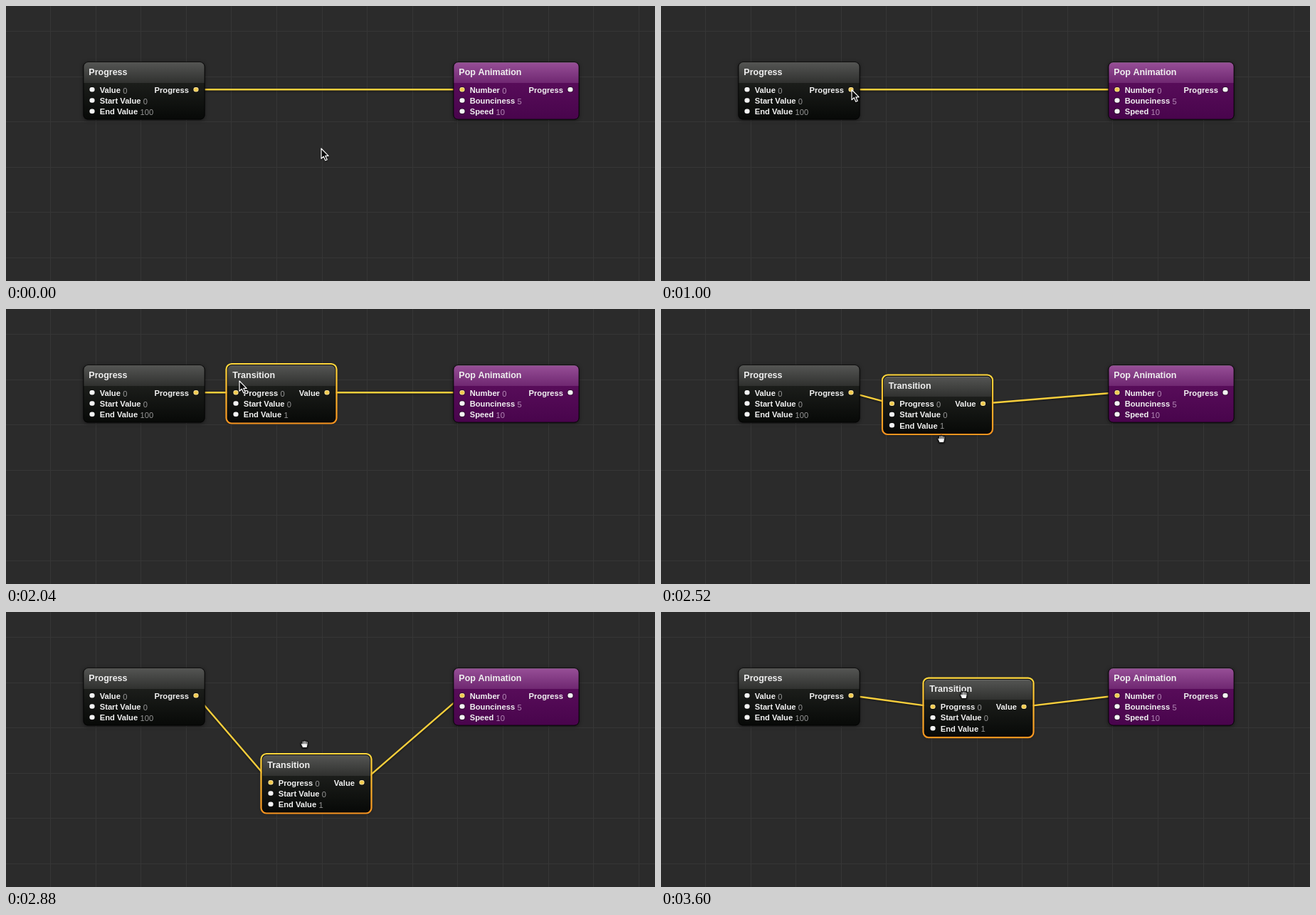
An HTML page with a canvas that plays this animation: 912 by 386 pixels, repeating every 3640 ms.

```html
<!DOCTYPE html>
<html lang="en">
<head>
<meta charset="utf-8">
<title>Inserting a patch</title>
<style>
html, body { margin: 0; width: 100%; height: 100%; overflow: hidden; background: #2b2b2b; }
canvas { display: block; }
</style>
</head>
<body>
<canvas id="stage" width="912" height="386"></canvas>
<script>
const ctx = document.getElementById('stage').getContext('2d');
const LOOP = 3640, STEP = 40;
const INSERT = 1520, GRAB = 2360, LAG = 80;
const GRIP = { x: 55.5, y: 21.5 };
const FONT = '"Liberation Sans", Arial, sans-serif';

// Pointer paths: [time, x, y]
const arrowPath = [
  [0, 443, 200], [240, 443, 200], [860, 270, 120], [960, 268, 117.5],
  [1640, 268, 117.5], [2040, 328, 101], [2280, 362, 95], [2360, 363.5, 94.5]
];
const handPath = [
  [2360, 366.5, 100.5], [2440, 368, 116], [2520, 394, 182], [2600, 408, 246],
  [2680, 412, 254], [2800, 415.5, 222.5], [2880, 419.5, 185], [3080, 423, 146.5],
  [3160, 425, 131], [3320, 425.5, 117], [3600, 425.5, 116]
];

const dark = { head: ['#5b5c5a', '#333432'], body: ['#1d1f1c', '#070907'], shine: '#858684' };
const purple = { head: ['#a355a3', '#782a7a'], body: ['#5e0c60', '#4e0452'], shine: '#c48ac4' };

const progress = {
  title: 'Progress', x: 109, y: 79, w: 170, skin: dark, output: 'Progress', outWired: true,
  inputs: [['Value', 0], ['Start Value', 0], ['End Value', 100]]
};
const pop = {
  title: 'Pop Animation', x: 629, y: 79, w: 176, skin: purple, output: 'Progress', inWired: true,
  inputs: [['Number', 0], ['Bounciness', 5], ['Speed', 10]]
};
const transition = {
  title: 'Transition', w: 152, skin: dark, output: 'Value', selected: true, inWired: true, outWired: true,
  inputs: [['Progress', 0], ['Start Value', 0], ['End Value', 1]]
};

// Monotone cubic interpolation along a path
function follow(path, t) {
  const last = path.length - 1;
  if (t <= path[0][0]) return { x: path[0][1], y: path[0][2] };
  if (t >= path[last][0]) return { x: path[last][1], y: path[last][2] };
  const i = path.findIndex(key => key[0] > t) - 1;
  const span = path[i + 1][0] - path[i][0], u = (t - path[i][0]) / span;
  const axis = d => {
    const slope = k => (path[k + 1][d] - path[k][d]) / (path[k + 1][0] - path[k][0]);
    const tangent = k => {
      if (k === 0 || k === last) return 0;
      const a = slope(k - 1), b = slope(k);
      return a * b > 0 ? 2 * a * b / (a + b) : 0;
    };
    const p = path[i][d], q = path[i + 1][d], ease = u * u * (3 - 2 * u);
    return p + (q - p) * ease
      + span * u * (1 - u) * (tangent(i) * (1 - u) - tangent(i + 1) * u);
  };
  return { x: axis(1), y: axis(2) };
}

function vertical(y0, y1, [from, to]) {
  const g = ctx.createLinearGradient(0, y0, 0, y1);
  g.addColorStop(0, from);
  g.addColorStop(1, to);
  return g;
}

function box(x, y, w, h, r) {
  ctx.beginPath();
  ctx.roundRect(x, y, w, h, r);
}

function text(str, x, y, font, color, align = 'left') {
  ctx.font = `${font} ${FONT}`;
  ctx.fillStyle = color;
  ctx.textAlign = align;
  ctx.fillText(str, x, y);
}

function drawGrid() {
  ctx.fillStyle = '#2b2b2b';
  ctx.fillRect(0, 0, 912, 386);
  ctx.fillStyle = '#363636';
  for (let x = 62; x < 912; x += 63.6) ctx.fillRect(Math.round(x), 0, 1, 386);
  for (let y = 35; y < 386; y += 63.6) ctx.fillRect(0, Math.round(y), 912, 1);
}

function drawWire(from, to) {
  ctx.save();
  ctx.shadowColor = 'rgba(0,0,0,.6)';
  ctx.shadowBlur = 3;
  ctx.shadowOffsetY = 1;
  ctx.strokeStyle = '#f8cf3c';
  ctx.lineWidth = 2.4;
  ctx.beginPath();
  ctx.moveTo(from.x + from.w - 12, from.y + 38.3);
  ctx.lineTo(to.x + 12, to.y + 38.3);
  ctx.stroke();
  ctx.restore();
}

function drawPort(x, y, wired) {
  box(x - 4.5, y - 4, 9, 8, 4);
  ctx.fillStyle = 'rgba(0,0,0,.55)';
  ctx.fill();
  box(x - 3.6, y - 3.2, 7.2, 6.4, 3);
  ctx.fillStyle = wired ? '#f4dfa0' : '#f4f4f4';
  ctx.fill();
  if (!wired) return;
  box(x - 2.7, y - 2.3, 5.4, 4.6, 2.2);
  ctx.fillStyle = '#f3cb4c';
  ctx.fill();
}

function drawPatch({ title, x, y, w, skin, inputs, output, inWired, outWired, selected }) {
  const h = 80, head = 29;
  ctx.save();
  ctx.shadowColor = 'rgba(0,0,0,.7)';
  ctx.shadowBlur = 5;
  ctx.shadowOffsetY = 1;
  box(x - .5, y - .5, w + 1, h + 1, 6.5);
  ctx.fillStyle = 'rgba(8,8,8,.75)';
  ctx.fill();
  ctx.restore();

  ctx.save();
  box(x, y, w, h, 6);
  ctx.clip();
  ctx.globalAlpha = .92;
  ctx.fillStyle = vertical(y, y + head, skin.head);
  ctx.fillRect(x, y, w, head);
  ctx.fillStyle = vertical(y + head, y + h, skin.body);
  ctx.fillRect(x, y + head, w, h - head);
  ctx.fillStyle = skin.shine;
  ctx.fillRect(x, y, w, 1);
  ctx.restore();

  box(x, y, w, h, 6);
  ctx.strokeStyle = 'rgba(0,0,0,.7)';
  ctx.lineWidth = 1;
  ctx.stroke();
  if (selected) {
    box(x - 1.5, y - 2, w + 3, h + 3.5, 7.5);
    ctx.strokeStyle = vertical(y, y + h, ['#ffd73c', '#f7941f']);
    ctx.lineWidth = 2.2;
    ctx.stroke();
  }

  text(title, x + 7.3, y + 17.6, 'bold 12.5px', '#efefef');
  inputs.forEach(([label, value], i) => {
    const row = y + 38.3 + i * 15.2;
    drawPort(x + 12, row, inWired && i === 0);
    text(label, x + 22.7, row + 4.4, 'bold 11.2px', '#f2f2f2');
    const width = ctx.measureText(label).width;
    text(value, x + 26 + width, row + 5.2, '11.2px', skin === purple ? '#b48ab6' : '#969696');
  });
  drawPort(x + w - 12, y + 38.3, outWired);
  text(output, x + w - 22, y + 42.7, 'bold 11.2px', '#f2f2f2', 'right');
}

const arrowShape = new Path2D('M0 0V14.2L3.3 11.2L5.8 16.8L8.2 15.8L5.8 10.3H10.2Z');
const handShape = new Path2D(
  'M-3.2 5.5C-3.5 3-5.8 1.5-5.5-.4C-5.3-1.4-4.3-1.4-3.6-.7V-3.3C-3.5-4.7-1.9-4.7-1.6-3.6' +
  'C-1.3-5.2.5-5.1.8-3.8C1.3-4.9 2.9-4.6 3-3.3C3.8-4 5.1-3.4 5-2.2C5 1 4.5 2.5 3.6 5.5Z');

function drawPointer(shape, { x, y }, fill, stroke) {
  ctx.save();
  ctx.translate(x, y);
  ctx.shadowColor = 'rgba(0,0,0,.5)';
  ctx.shadowBlur = 2;
  ctx.shadowOffsetY = 1;
  ctx.lineJoin = 'round';
  ctx.lineWidth = 1.2;
  ctx.fillStyle = fill;
  ctx.strokeStyle = stroke;
  ctx.fill(shape);
  ctx.stroke(shape);
  if (shape === handShape) {
    ctx.fillStyle = '#222';
    for (const knuckle of [-1.6, .7, 2.9]) ctx.fillRect(knuckle - .4, -3, .8, 3);
  }
  ctx.restore();
}

function draw(time) {
  const t = Math.floor(time % LOOP / STEP) * STEP;
  drawGrid();
  if (t >= INSERT) {
    const held = follow(handPath, t - LAG);
    transition.x = held.x - GRIP.x;
    transition.y = held.y - GRIP.y;
    drawWire(progress, transition);
    drawWire(transition, pop);
  } else {
    drawWire(progress, pop);
  }
  drawPatch(progress);
  drawPatch(pop);
  if (t >= INSERT) drawPatch(transition);
  if (t < GRAB) drawPointer(arrowShape, follow(arrowPath, t), '#0a0a0a', '#fff');
  else drawPointer(handShape, follow(handPath, t), '#fff', '#111');
}

const start = performance.now();
function tick() {
  draw(performance.now() - start);
  requestAnimationFrame(tick);
}
tick();
</script>
</body>
</html>
```
